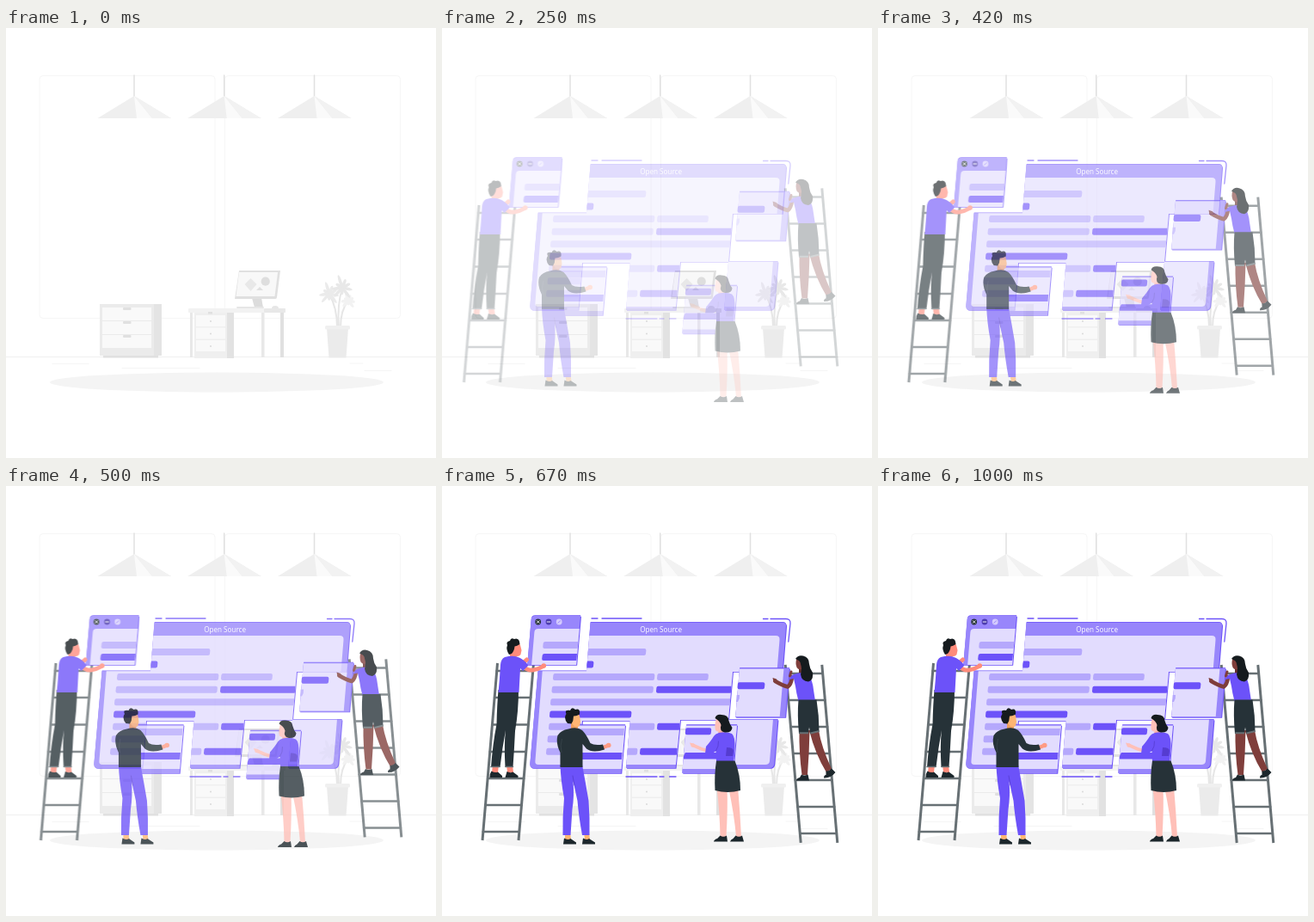
These frames come from a looping animation (500x500 px, 1040 ms). An HTML page:

```html
<!DOCTYPE html>
<html lang="en">
<head>
<meta charset="utf-8">
<title>Open Source</title>
<style>
html, body { margin: 0; width: 100%; height: 100%; overflow: hidden; background: #fff; }
svg { display: block; width: 100vw; height: 100vh; }
text { font: 500 8.1px "Open Sans", "Noto Sans", sans-serif; fill: #fff; }
</style>
</head>
<body>
<svg id="stage" viewBox="0 0 500 500"></svg>
<script>
const MAIN = '#6c52f9', MID = '#9886fb', SOFT = '#b5a8fc', PALE = '#e2dcfe';
const INK = '#263238', RAIL = '#677074', SLANT = 0.085;

const path = (d, fill, extra = '') => `<path d="${d}" fill="${fill}" ${extra}/>`;
const line = (d, color, w = 1, cap = 'round') =>
  `<path d="${d}" fill="none" stroke="${color}" stroke-width="${w}" stroke-linecap="${cap}" stroke-linejoin="round"/>`;
const rect = (x, y, w, h, fill, rx = 0) =>
  `<rect x="${x}" y="${y}" width="${w}" height="${h}" rx="${rx}" fill="${fill}"/>`;
const dot = (x, y, r, fill) => `<circle cx="${x}" cy="${y}" r="${r}" fill="${fill}"/>`;

// Leaning text bar, 8 px high, rounded by its own stroke
const bar = (x, y, w, color) =>
  path(`M${x + 2.4} ${y + 2}h${w - 4}l-.4 4h${4 - w}z`, color,
    `stroke="${color}" stroke-width="4" stroke-linejoin="round"`);

const lean = (x, y, w, h, r = 0) =>
  `M${x + r} ${y}H${x + w}l${-SLANT * h} ${h}h${-w}L${x - SLANT * r} ${y + r}Q${x} ${y} ${x + r} ${y}z`;

function panel(x, y, w, h, [l, t, r, b], round = 0) {
  const body = lean(x, y, w, h, round);
  return path(body, MAIN, 'transform="translate(1 .7)"') +
    path(body, MAIN, 'transform="translate(.2 -.8)"') + path(body, MID) +
    path(lean(x + l - SLANT * t, y + t, w - l - r, h - t - b, round), PALE);
}

function ladder(x1, x2, y1, y2, shift, rungs) {
  const at = (x, y) => x + shift * (y - y1) / (y2 - y1);
  return rungs.map(y => line(`M${at(x1, y)} ${y}H${at(x2, y)}`, RAIL, 2.6)).join('') +
    [x1, x2].map(x => line(`M${x} ${y1}L${x + shift} ${y2}`, RAIL, 3, 'butt')).join('');
}

function lamp(x) {
  return line(`M${x} 55V80`, '#e0e0e0', 1.5) +
    path(`M${x} 79L${x - 42.5} 105H${x + 43}z`, '#efefef') +
    path(`M${x} 79L${x + 3} 105H${x + 21}z`, '#fafafa') +
    path(`M${x} 79L${x + 21} 105H${x + 43}z`, '#f2f2f2');
}

function leaves(x, y, r, color) {
  let s = '';
  for (let i = 0; i < 9; i++) {
    const n = r * (0.8 + 0.25 * Math.sin(i * 2.3));
    s += `<ellipse cx="${n / 2}" rx="${n / 2}" ry="1.8" fill="${color}" transform="translate(${x} ${y}) rotate(${i * 40 + 12})"/>`;
  }
  return s;
}

function room() {
  let s = [39, 254.5].map(x =>
    `<rect x="${x}" y="55.5" width="204" height="282" rx="4" fill="none" stroke="#f6f6f6"/>`).join('');
  s += line('M0 382.5H500', '#efefef') +
    line('M54 390.5H96M135 395.5H225M400 390H415M417 398.5H448', '#f5f5f5');
  s += [149, 253.7, 358.5].map(lamp).join('');
  // dresser
  s += rect(113, 379, 64, 4.5, '#e0e0e0') + rect(172, 321, 9, 60, '#e4e4e4') + rect(109, 321, 63, 60, '#ebebeb');
  for (const y of [325, 341, 357])
    s += rect(112, y, 57, 15, '#f9f9f9') + rect(136, y, 9.5, 3, '#e0e0e0', 1);
  // desk
  s += rect(214, 331, 3, 52, '#e8e8e8') + rect(297, 331, 3.5, 52, '#e8e8e8') + rect(319, 331, 4, 52, '#e0e0e0') +
    rect(257, 331, 8, 53, '#e2e2e2') + rect(219, 331, 38, 53, '#efefef');
  for (const y of [334, 348.5, 363])
    s += rect(221, y, 34, 13, '#f9f9f9') + dot(238, y + 7, 1.1, '#dcdcdc');
  s += rect(212, 326, 113, 5, '#f2f2f2', 1) + rect(300, 326, 25, 5, '#e8e8e8', 1) + rect(235, 330, 5, 2.5, '#e0e0e0');
  // monitor
  s += path('M286 314H297L299 325H289z', '#dcdcdc') + rect(268, 324, 32, 2, '#e6e6e6', 1) +
    path('M309 326Q309 323 313 323T317 326z', '#e6e6e6') +
    path('M271 282H319L315 313Q315 315 313 315H266z', '#e0e0e0') +
    path('M271 284H316L312.500 312H267.500z', '#f8f8f8') +
    path('M284.500 291L291.500 298L284.500 306L277.500 298z', '#e8e8e8') + dot(301.7, 294.7, 5.1, '#dedede') +
    path('M291 305L295 301L299 305z', '#e0e0e0');
  // plant
  s += line('M385 348Q385 325 376 310M387 348Q385 320 391 303M389 348Q389 328 398 317', '#e6e6e6', 2) +
    leaves(398, 317, 10, '#f2f2f2') + leaves(376, 309, 14, '#ebebeb') + leaves(391, 302, 15, '#e8e8e8') +
    path('M373 349H398L395.500 383.500H375.500z', '#ebebeb') + rect(371, 346, 29, 4.5, '#f0f0f0', 1.5);
  return s + '<ellipse cx="245" cy="412" rx="194" ry="11.5" fill="#f4f4f4"/>';
}

function board() {
  const shape = 'M172.500 158.800H396Q400.300 158.800 400 163L395.800 216H338L333 271.800H390.500L386.300 323Q385.600 328 381 328H328L333 272H277L271.500 328H214L218.500 273H163L158.500 328H106Q101.800 328 102.300 323L111.500 215.300H168z';
  const inner = 'M120 174H388Q393 174 392.500 179L381 320Q380.500 324 376 324H112Q108 324 108.400 320z';
  const rows = [
    [160, 189, 77, SOFT], [160, 203.5, 16, MAIN],
    [129, 218, 118, SOFT], [250, 218, 59.5, SOFT],
    [127.5, 232.7, 118, SOFT], [249, 232.7, 100, MAIN],
    [126, 247.2, 230, SOFT], [125, 261.5, 95, MAIN],
    [124, 275.8, 123, SOFT], [250, 275.8, 40, MAIN],
    [122.5, 290.3, 60, SOFT], [121, 304.8, 106, SOFT], [230, 304.8, 44, MAIN]
  ];
  return `<clipPath id="cut"><path d="${shape}"/></clipPath>` +
    path(shape, MAIN, 'transform="translate(1 .8)"') + path(shape, MAIN, 'transform="translate(.2 -.8)"') +
    path(shape, MID) +
    `<g clip-path="url(#cut)">${path(inner, PALE)}${rows.map(r => bar(...r)).join('')}</g>` +
    '<text x="254.600" y="169.600" text-anchor="middle">Open Source</text>' +
    line('M174 154H181M186 154H232M373.500 154.500H379M382 154.500H400Q405.500 154.500 405 160L402.800 181M214 338H250M253 338H258M264.500 338H272', MAIN, 1.3);
}

function climber() {
  const skin = '#ff8b7b';
  return ladder(64.5, 106.5, 206, 412, -17.5, [215, 246, 277.5, 309, 340, 371, 402]) +
    panel(104, 151, 57, 57, [5, 15, 0, 0], 4) +
    dot(111.7, 158, 3.4, INK) + line('M110.300 156.600l2.800 2.800m0-2.800l-2.800 2.800', '#fff', .9) +
    dot(124, 158, 3.4, '#4c3caf') + line('M122.200 158h3.600', '#fff', .9) +
    dot(136.2, 158, 3.4, '#d5ccfd') + line('M134.800 159.200l2.800-2.400', MID, .9) +
    path('M120 181H158.300L157.600 189H119.300Q117 189 117.300 187L117.700 183Q118 181 120 181z', SOFT) +
    path('M119 195H157L156.300 203H118Q116 203 116.200 201L116.700 197Q117 195 119 195z', MAIN) +
    // legs and shoes
    path('M59 324h7l-1 9h-7zM75 324h7l1 9h-7z', skin) +
    path('M57.500 331.500Q62 334 65 332.500L70 337V339H55.500Q55 335 57.500 331.500zM75.500 332Q79 334 82.500 332.500L88.500 337V339H73.500z', '#1c272c') +
    path('M65.500 237H89Q89 262 85 285Q84 306 82.500 327H73.500Q72 300 74 284Q70 305 67.500 327H57Q59 300 63.500 277Q64 255 65.500 237z', INK) +
    line('M57 326.500h10M74 326.500h8.500', RAIL, 1.5) +
    // arms and shirt
    line('M94 206L98.500 202', skin, 5) +
    line('M94 209Q99 215 106 214Q112 213 118 209.500', skin, 4.8) + dot(118.3, 209, 2.8, skin) +
    path('M79 191h8v7q-3 5-8 1z', skin) +
    path('M73 199Q81 197 87 198.500Q95 201 100.500 208.500L94 215L91 212L89.500 240H65.500Q67 225 68 208Q68.500 201 73 199z', MAIN) +
    // head
    path('M81 183Q89 180 91 185L92.500 191L91.500 196Q89 199.500 84 197L80 191z', skin) +
    path('M78 196Q74 190 76 185Q74 181 79 180Q80 176 84 178Q90 176 90.500 184Q87 186 84.500 186.500Q84 192 81 195z', '#151b1e');
}

function worker() {
  const skin = '#ffb573';
  return panel(155, 278, 58, 56, [0, .8, 0, 5]) +
    path('M154.500 282H212L211.300 290H154z', SOFT) + path('M152 310H209.500L208.800 318H151.500z', MAIN) +
    path('M143 403h6l1 8h-7zM165 403h6l1 8h-6z', skin) +
    path('M142 409.500Q146 412 149.500 410L156 414.500V416.500H141zM164 409.500Q168 412 171 410L178 414.500V416.500H163z', '#1c272c') +
    path('M137.500 324H163Q167 345 170.500 366Q172 386 171.500 406H163Q159 384 157.500 366L152.500 343Q154 360 151.500 376L149.500 406H140.500Q140 385 142 363Q138 342 137.500 324z', MAIN) +
    line('M152 337L154 348', '#553cd0', .8) +
    line('M181 306Q188 304 194 301.500', '#ff9b84', 4.5) + dot(193.7, 301.5, 2.8, '#ff9b84') +
    path('M150 275h8v7q-3 5-8 2z', '#f0a060') +
    path('M147 282.500Q157 279.500 163 284Q168 289 172.500 299Q177 302 187 300.500L189 306.500Q175 311 168 305.500L163.500 300V327H137.500V310Q132 299 134.500 290Q138 284 147 282.500z', INK) +
    path('M139.500 294Q137 302 139 310', 'none', 'stroke="#39464c" stroke-width=".8"') +
    path('M151 265Q157 263 160 267L161 274L160 279Q156 281.500 152.500 278L149 272z', skin) +
    path('M146 276Q141 270 144.500 265Q142 260 149 261Q151 256 155 260Q161 258 160 265.500Q156 268 153 267.500Q153 273 150.500 276.500z', '#151b1e');
}

function helper() {
  const skin = '#ffc0b8';
  return panel(284, 278, 59, 56, [0, .8, 0, 5]) +
    bar(282.8, 281.2, 30, MAIN) + path('M283 310H339.800L339.200 317.500H281Q280 314 283 310z', MAIN) +
    path('M319.500 350H331.500Q332.500 374 330.500 408H323.500Q323 380 319.500 350zM333 350H344Q346.500 378 348 408H342Q340 383 333 350z', skin) +
    path('M323.500 406.500Q327 409 331 406.500L332 413.500H316Q316.500 411 320 410zM341.500 406.500Q345 409 349 406.500L351 413.500H335Q335.500 411 338.500 410z', '#1c272c') +
    line('M309 308Q301 306 292 301.500', skin, 4) + path('M293 299.500L288 298.500L290 303.500L295 304z', skin) +
    path('M322 282h7v7h-8z', '#f5aaa4') +
    path('M322 287Q331 285 337 288Q341 291 340.500 305L339 321H319L318.500 308Q313 313 306 311L307 303Q313 296 316 291Q318 288 322 287z', MAIN) +
    line('M318.500 308Q322 303 321.500 297', '#553cd0', .8) + path('M331 304Q339 304 339 308L338 314H330z', '#553cd0') +
    path('M319 319.500H340.500Q347 335 347 354Q332 358 317.500 354Q316.500 335 319 319.500z', INK) +
    path('M319 270Q325 267 328 272L327 283Q322 288 318 284Q316.500 278 319 270z', skin) +
    path('M317.500 270Q319 265 325 266Q333 266 333.500 273Q334.500 277 337.500 281Q337 287 329 286.500Q322 285 324.500 278Q323 273 317.500 270z', '#151b1e');
}

function painter() {
  const skin = '#7f3e3b';
  return ladder(399.2, 441.8, 208, 415, 18, [218, 249, 280, 311, 342, 373, 404]) +
    panel(346, 212, 58, 57, [0, .8, 6.5, 1]) +
    bar(343.5, 228.3, 31.5, MAIN) + path('M342.700 243H346Q346.500 247 344 251H342z', SOFT) +
    path('M415.500 284H427.500Q427 310 425 336H418.500Q415 310 415.500 284zM427 284H438Q441 303 453 329L447 333Q434 312 427 284z', skin) +
    path('M418 335.500Q421 337.500 425.500 335.500L427 342.500H412Q412.500 339.500 416 339zM446.500 331.500Q450 332 453 328.500L457.500 333Q452 340 444 339.500Q444 336 446.500 336z', '#1c272c') +
    line('M407 222Q406 231 402 233.500Q396 232 387.500 227', skin, 4.6) + path('M389 224.500L384.500 223L385.500 228L391 230z', skin) +
    line('M406 216L404.500 221', skin, 3) +
    path('M415 210h8v9h-8z', '#64302e') +
    path('M411 218.500Q419 216 426 219Q431 226 432 237L434 250H414.500Q412 241 411 233L409 224L404 225Q405 219.500 411 218.500z', MAIN) +
    path('M414.500 248.500H435.500Q438.500 267 438.500 285L428 288L427 280L426 288H415Q413 266 414.500 248.500z', INK) +
    line('M415.300 287.300H426M428.500 287.500L438.800 285', RAIL, 2, 'butt') +
    path('M412.500 200Q418 197 421 203L420 212Q415 215 412.500 211Q410.500 206 412.500 200z', skin) +
    path('M411 201Q414 196 420 197.500Q427 199 427 207Q427.500 212 431 217Q432 226 426 227.500Q418 227 417 219Q419 213 417 207Q417 203 411 201z', '#151b1e');
}

// Each layer slides in from its offset while fading up
const layers = [
  [board, 0, 0], [climber, -30, 0], [worker, -30, 0], [painter, 0, -30], [helper, 0, 30]
];
const stage = document.getElementById('stage');
stage.innerHTML = room() + layers.map(([draw]) => `<g class="layer">${draw()}</g>`).join('');
const nodes = [...stage.querySelectorAll('.layer')];

const LOOP = 1040, STEPS = 25;

function ease(x) {
  const curve = (a, b, s) => 3 * a * s * (1 - s) ** 2 + 3 * b * s * s * (1 - s) + s ** 3;
  let lo = 0, hi = 1;
  for (let i = 0; i < 30; i++) {
    const mid = (lo + hi) / 2;
    if (curve(0.36, 0.5, mid) < x) lo = mid; else hi = mid;
  }
  return curve(-0.01, 1.38, lo);
}

// Step times fall on whole hundredths of a second at 24 steps per second
function stepAt(t) {
  let k = STEPS - 1;
  while (k > 0 && Math.round(k * 25 / 6) * 10 > t) k--;
  return k;
}

function render(t) {
  const k = stepAt(t);
  const p = k < 2 ? 0 : ease((k + 1) / STEPS);
  nodes.forEach((node, i) => {
    const [, dx, dy] = layers[i];
    node.setAttribute('opacity', Math.max(0, Math.min(1, p)));
    node.setAttribute('transform', `translate(${dx * (1 - p)} ${dy * (1 - p)})`);
  });
}

const start = performance.now();
function tick() {
  render((performance.now() - start) % LOOP);
  requestAnimationFrame(tick);
}
tick();
</script>
</body>
</html>
```
